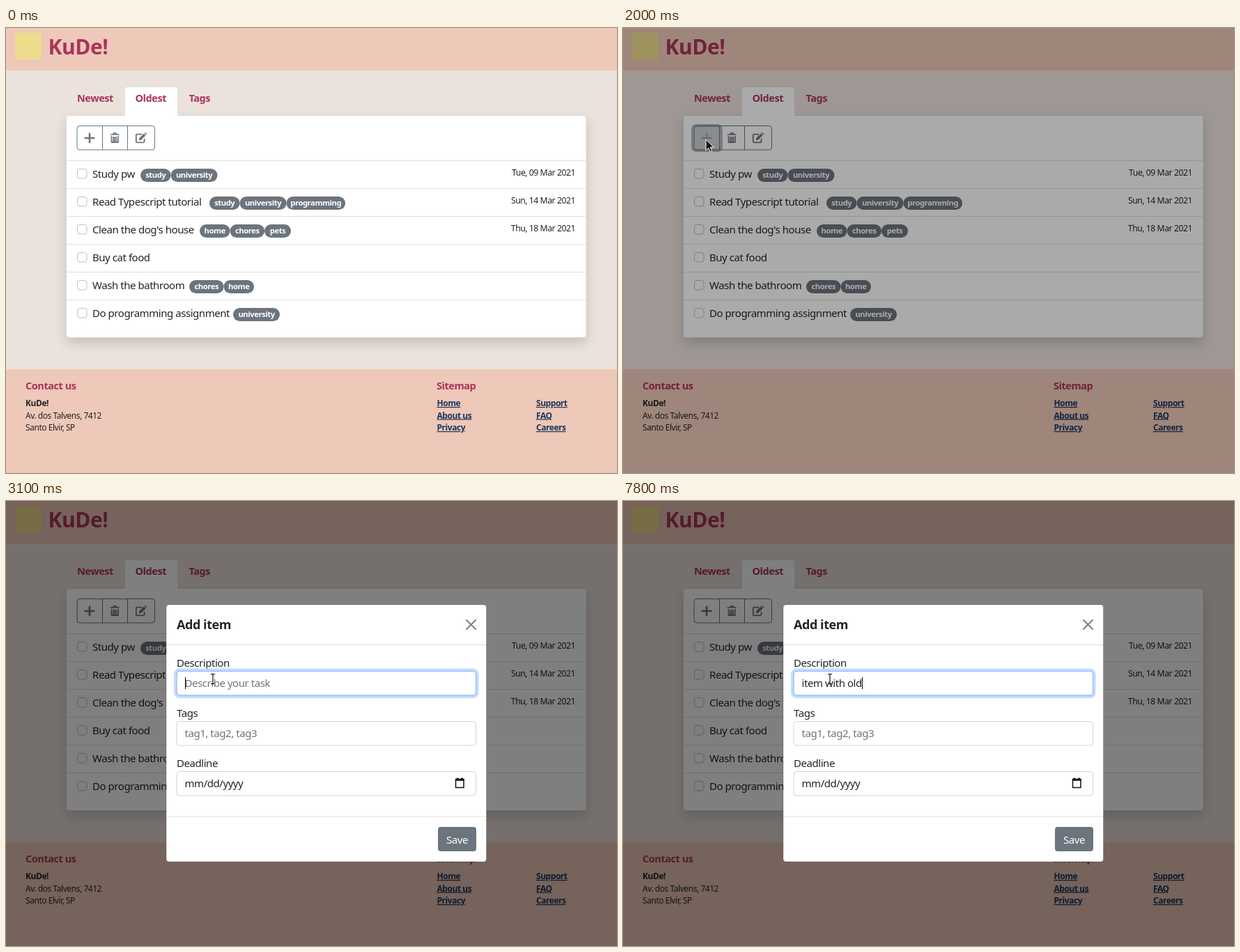
An HTML page that plays this animation: 877 px wide and 639 px high, repeating every 8000 ms.

```html
<!DOCTYPE html>
<html lang="en">
<head>
<meta charset="utf-8">
<title>Task list</title>
<style>
  html, body { margin: 0; width: 100%; height: 100%; overflow: hidden; }
  svg { display: block; font: 15px "Noto Sans", sans-serif; letter-spacing: -.03em; fill: #212529; }
  text { white-space: pre; }
  .title { font-size: 30px; font-weight: 600; fill: #a9345b; }
  .head { font-size: 14.5px; font-weight: 600; fill: #a9345b; }
  .modal-title { font-size: 18px; font-weight: 600; }
  .small { font-size: 12px; }
  .date { font-size: 12.2px; text-anchor: end; }
  .bold { font-weight: 700; }
  .link { fill: #1b365d; text-decoration: underline; }
  .badge { font-size: 11.25px; font-weight: 700; fill: #fff; text-anchor: middle; }
  .muted { fill: #6c757d; }
  .peach { fill: #eec8b8; }
  .white { fill: #fff; }
  .line { stroke: #dfdfdf; }
  .field { fill: #fff; stroke: #ced4da; }
</style>
</head>
<body>
<svg id="stage" width="877" height="639" viewBox="0 0 877 639"></svg>
<script>
const GREY = '#6c757d';
const rect = (x, y, w, h, attrs = '') => `<rect x="${x}" y="${y}" width="${w}" height="${h}" ${attrs}/>`;
const text = (x, y, str, cls = '') => `<text x="${x}" y="${y}" class="${cls}">${str}</text>`;
const rule = (x1, x2, y) => `<path class="line" d="M${x1} ${y}H${x2}"/>`;

const badgeWidth = { study: 43.5, university: 67, programming: 84.5, home: 43.5, chores: 49.5, pets: 38 };
const tasks = [
  ['Study pw', 193, ['study', 'university'], 'Tue, 09 Mar 2021'],
  ['Read Typescript tutorial', 292, ['study', 'university', 'programming'], 'Sun, 14 Mar 2021'],
  ["Clean the dog's house", 278, ['home', 'chores', 'pets'], 'Thu, 18 Mar 2021'],
  ['Buy cat food', 0, []],
  ['Wash the bathroom', 263, ['chores', 'home']],
  ['Do programming assignment', 326, ['university']],
];

function taskRow([name, x, tags, date = ''], i) {
  const y = 190.5 + Math.round(i * 39.9);
  let out = rule(87, 833, y)
    + rect(102.5, y + 12, 13.5, 13.5, 'rx="3.5" fill="#fff" stroke="#bfbfbf"')
    + text(124, y + 24.5, name) + text(817, y + 21.5, date, 'date');
  for (const tag of tags) {
    const w = badgeWidth[tag];
    out += rect(x, y + 11.5, w, 19, `rx="9.5" fill="${GREY}"`) + text(x + w / 2, y + 24.5, tag, 'badge');
    x += w;
  }
  return out;
}

const icons = `<defs>
  <path id="plus" d="M113.7 158h12.6M120 151.7v12.6" stroke="currentColor" stroke-width="2.6" stroke-linecap="round"/>
  <g id="trash" fill="none" stroke="currentColor">
    <path d="M149.8 153h12.8M153.8 152.5l1-1.7h2.8l1 1.7" stroke-width="1.6"/>
    <path d="M151.4 155v8.8h9.6v-8.8M154 156v7M156.2 156v7M158.4 156v7" stroke-width="1.6" stroke-linejoin="round"/>
    <path d="M151 164.3h10.4" stroke-width="1.5"/>
  </g>
  <g id="edit" fill="none" stroke="currentColor">
    <path d="M195 152.6h-7q-1.2 0-1.2 1.2v9.3q0 1.2 1.2 1.2h9.4q1.2 0 1.2-1.2v-4" stroke-width="1.8"/>
    <path d="M190.8 161.2l.5-3.3 6.5-6.4 2.7 2.7-6.5 6.5zM198.6 150.7l1.1-1 2.6 2.6-1 1.1z" fill="currentColor" stroke="none"/>
  </g>
</defs>`;

const page = rect(0, 0, 877, 639, 'fill="#ece2dc"')
  + rect(0, 0, 877, 61, 'class="peach"') + rect(0, 490, 877, 149, 'class="peach"')
  + rect(13, 7, 38, 38, 'fill="#eddc8c"')
  + text(60.5, 38, 'KuDe!', 'title')
  + rect(86.5, 125.5, 746.5, 319, 'rx="4" class="white" style="filter:drop-shadow(0 8px 8px #00000026)"')
  + rect(86.5, 125.5, 746.5, 319, 'rx="4" fill="none" stroke="#d9d9dc"')
  + '<path class="white" stroke="#dee2e6" d="M170.5 125.5V88.5q0-4 4-4H242.5q4 0 4 4V125.5"/>'
  + rect(171, 124, 75, 3, 'class="white"')
  + text(102, 106, 'Newest', 'head') + text(185.5, 106, 'Oldest', 'head') + text(262.5, 106, 'Tags', 'head')
  + rect(102, 140.5, 111.5, 34.5, `rx="4" fill="none" stroke="${GREY}"`)
  + `<path stroke="${GREY}" d="M138.5 140.5v34.5M174.5 140.5v34.5"/>`
  + rect(100, 140, 41, 36, `id="ring" rx="5" fill="none" stroke="${GREY}" stroke-width="4"`)
  + ['plus', 'trash', 'edit'].map(id => `<use href="#${id}" color="${GREY}"/>`).join('')
  + [['plus', 102], ['trash', 138]].map(([id, x]) =>
      `<g id="${id}Hover">${rect(x, 140.5, 37, 35, `rx="3" fill="${GREY}"`)}<use href="#${id}" color="#fff"/></g>`).join('')
  + tasks.map(taskRow).join('')
  + text(28, 519, 'Contact us', 'head') + text(618, 519, 'Sitemap', 'head')
  + text(28, 543, 'KuDe!', 'small bold')
  + text(28, 560.5, 'Av. dos Talvens, 7412', 'small') + text(28, 578, 'Santo Elvir, SP', 'small')
  + [['Home', 'Support'], ['About us', 'FAQ'], ['Privacy', 'Careers']].map((pair, row) =>
      pair.map((name, col) => text(618.5 + col * 142.5, 543 + row * 17.5, name, 'small bold link')).join('')).join('');

const field = (y, label) => text(245, y - 6, label) + rect(245, y + .5, 429.5, 34.5, 'rx="4" class="field"');

const modal = `<g id="modal">`
  + rect(230, 149, 459.5, 369, 'rx="4" class="white" stroke="#00000033"')
  + text(245, 184, 'Add item', 'modal-title')
  + '<path stroke="#7f7f7f" stroke-width="2" stroke-linecap="round" d="M661 171l13 13m0-13l-13 13"/>'
  + rule(230, 689, 206.5) + rule(230, 689, 453)
  + field(244, 'Description') + field(316, 'Tags') + field(388, 'Deadline')
  + `<g id="focus" fill="none">${rect(243, 242.5, 433.5, 38.5, 'rx="6" stroke="#c2dbfe" stroke-width="4"')}
     ${rect(245, 244.5, 429.5, 34.5, 'rx="4" stroke="#86b7fe"')}</g>`
  + '<text id="entry" x="256.5" y="267"></text><path id="caret" stroke="#000"/>'
  + text(256.5, 339, 'tag1, tag2, tag3', 'muted') + text(256.5, 411, 'mm/dd/yyyy')
  + '<path fill="none" stroke="#111" stroke-width="1.5" d="M645.5 399.5h11.5v12h-11.5z"/>'
  + '<path stroke="#111" stroke-width="2.5" d="M645 400.5h12.5M648 397.5v2M654.5 397.5v2"/>'
  + rect(620, 468, 55, 35, `rx="4" fill="${GREY}"`)
  + '<text x="647.5" y="491.5" class="white" text-anchor="middle">Save</text></g>';

const pointers = `<path id="arrow" stroke="#fff" fill="#111" d="M0 0V15.5L3.7 12.2 6.1 17.8 8.7 16.7 6.3 11.2H11.2Z"/>
  <g id="beam" fill="none" stroke="#111" stroke-width="1.2">
    <path stroke="#fff" stroke-width="2.6" d="M0-6V6"/>
    <path d="M-3-7H-1Q0-7 0-6V6Q0 7-1 7H-3M3-7H1Q0-7 0-6M3 7H1Q0 7 0 6"/>
  </g>`;

const stage = document.getElementById('stage');
stage.innerHTML = icons + page + rect(0, 0, 877, 639, 'id="shade" fill="#000"') + modal + pointers;

const el = id => document.getElementById(id);
const set = (id, name, value) => el(id).setAttribute(name, value);
const fade = (id, value) => set(id, 'opacity', value);
const ramp = (t, start, length) => Math.min(1, Math.max(0, (t - start) / length));

const typing = [
  [4000, 'i'], [4200, 'it'], [4600, 'ite'], [4800, 'item '], [5000, 'item w'], [5200, 'item wo'],
  [5500, 'item wor'], [5700, 'item wori'], [6000, 'item wor'], [6100, 'item wo'], [6300, 'item w'],
  [6800, 'item wi'], [7100, 'item wit'], [7200, 'item with '], [7400, 'item with o'],
  [7600, 'item with ol'], [7800, 'item with old'],
];

function pointerAt(t) {
  if (t < 2800) {
    const u = ramp(t, 700, 900), v = 1 - u;
    return [v * v * 212 + 2 * v * u * 170 + u * u * 119, v * v * 2 + 2 * v * u * 150 + u * u * 160];
  }
  const u = ramp(t, 2700, 300), s = u * u * (3 - 2 * u);
  return [119 + 178 * s, 160 + 95.5 * s];
}

function draw(t) {
  // Pointer and toolbar
  const at = `translate(${pointerAt(t)})`;
  const overField = t >= 3000;
  set('arrow', 'transform', at);
  set('beam', 'transform', at);
  fade('arrow', t >= 700 && !overField ? 1 : 0);
  fade('beam', overField ? 1 : 0);
  fade('trashHover', t === 1400 ? 1 : 0);
  fade('plusHover', t < 1500 ? 0 : 1 - ramp(t, 1900, 150));
  fade('ring', .5 * (ramp(t, 1850, 150) - ramp(t, 2925, 150)));

  // Dialog: fades in while sliding down with ease-out
  fade('shade', .5 * ramp(t, 1900, 150));
  fade('modal', ramp(t, 2062, 150));
  set('modal', 'transform', `translate(0 ${-50 * (1 - ramp(t, 2055, 300)) ** 1.75})`);
  fade('focus', ramp(t, 2925, 150));

  // Text field
  const typed = typing.reduce((value, [start, str]) => t >= start ? str : value, '');
  const entry = el('entry');
  entry.textContent = typed || 'Describe your task';
  entry.setAttribute('class', typed ? '' : 'muted');
  const x = Math.round(256.5 + (typed ? entry.getComputedTextLength() : 0)) + .5;
  set('caret', 'd', `M${x} 253V270`);
  fade('caret', t >= 3000 && (t < 3600 || t >= 4000) ? 1 : 0);
}

function loop() {
  draw(Math.floor(performance.now() % 8000 / 100) * 100);
  requestAnimationFrame(loop);
}
loop();
</script>
</body>
</html>
```
